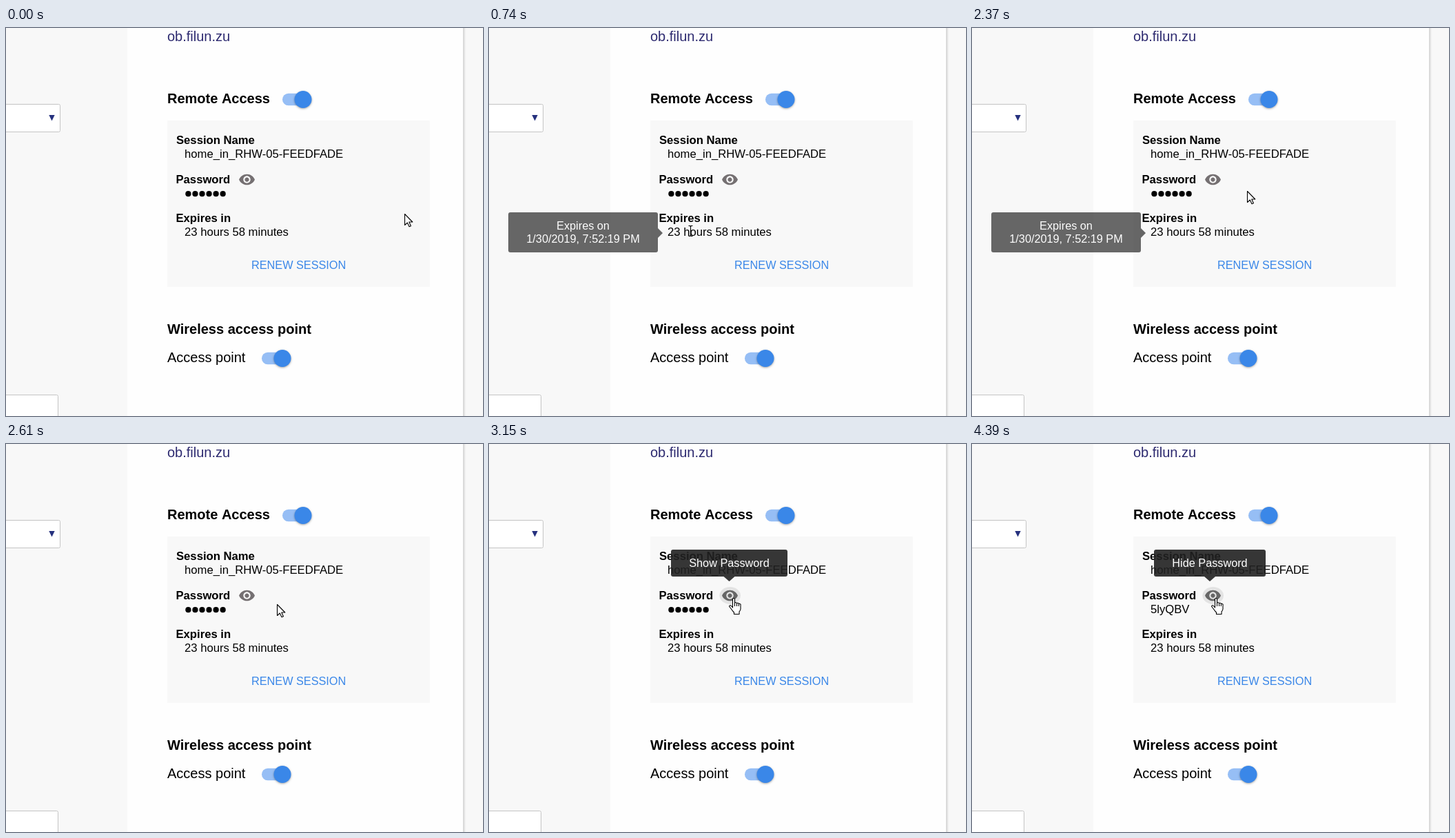
An HTML page with a canvas that plays this animation: 692 by 562 pixels, repeating every 5.33 s.

```html
<!DOCTYPE html>
<html lang="en">
<head>
<meta charset="utf-8">
<title>Remote access settings</title>
<style>
html, body { margin: 0; width: 100%; height: 100%; overflow: hidden; background: #fefefe; }
canvas { display: block; }
</style>
</head>
<body>
<canvas id="stage" width="692" height="562"></canvas>
<script>
const LOOP = 5330, W = 692, H = 562;
const REVEAL = 4040;
const FONT = '"Liberation Sans", Arial, sans-serif';
const BLUE = '#3a87e8';

const stage = document.getElementById('stage').getContext('2d');
const layer = document.createElement('canvas');
layer.width = W;
layer.height = H;
const bubble = layer.getContext('2d');

const EYE = new Path2D('M12 4.5C7 4.5 2.73 7.61 1 12c1.73 4.39 6 7.5 11 7.5s9.27-3.11 11-7.5c-1.73-4.39-6-7.5-11-7.5z' +
  'M12 17c-2.76 0-5-2.24-5-5s2.24-5 5-5 5 2.24 5 5-2.24 5-5 5z' +
  'M12 9c-1.66 0-3 1.34-3 3s1.34 3 3 3 3-1.34 3-3-1.34-3-3-3z');
const ARROW = new Path2D('M.5 .5V16.5L4.3 13L7 18.8L9.4 17.7L6.8 12H11.8Z');
const IBEAM = new Path2D('M-3 -7.5H-1L0 -6.5L1 -7.5H3M0 -6.5V6.5M-3 7.5H-1L0 6.5L1 7.5H3');
const HAND = new Path2D('M5.5 14V2Q5.5 .5 7 .5T8.5 2V8Q8.5 6.5 10 6.5T11.5 8.5Q11.5 7 13 7.2T14.3 9' +
  'Q14.5 8 16 8.5T17 10.5V16Q16.6 18.5 15 20V23.5H7.5V21Q5 18.5 3.5 16L.7 12.5Q.5 10.5 2.3 10.7Q3.8 11.3 5.5 14Z' +
  'M8.5 8V12M11.5 8.5V12M14.3 9V12');

// Progress 0..1 in n equal hard steps, the first at start and the last at end.
function steps(t, start, end, n) {
  if (t < start) return 0;
  const k = Math.floor((t - start + 8) / ((end - start) / (n - 1)));
  return Math.min(n, k + 1) / n;
}

const smooth = u => u * u * (3 - 2 * u);

function curve(u, from, via, to) {
  return from.map((a, i) => (1 - u) ** 2 * a + 2 * u * (1 - u) * via[i] + u * u * to[i]);
}

function pointer(t) {
  if (t < 600) return curve(smooth(steps(t, 80, 420, 6)), [578, 269], [400, 217], [298, 287]);
  if (t < 1830) return [292, 293.5];
  if (t < 2370) {
    const u = 1 - (1 - steps(t, 1830, 2290, 7)) ** 1.2;
    return curve(u, [292, 293], [346, 231], [399, 237]);
  }
  return curve(steps(t, 2370, 2840, 7) ** 1.5, [399, 237], [398, 231], [370, 225]);
}

function text(c, str, x, y, size, color = '#000', weight = 400, align = 'left') {
  c.font = `${weight} ${size}px ${FONT}`;
  c.fillStyle = color;
  c.textAlign = align;
  c.fillText(str, x, y);
}

function rect(x, y, w, h, color) {
  stage.fillStyle = color;
  stage.fillRect(x, y, w, h);
}

function disc(x, y, r, color) {
  stage.fillStyle = color;
  stage.beginPath();
  stage.arc(x, y, r, 0, 2 * Math.PI);
  stage.fill();
}

function field(right, top, height) {
  stage.beginPath();
  stage.roundRect(-9.5, top + .5, right + 9, height, 2);
  stage.fillStyle = '#fff';
  stage.fill();
  stage.strokeStyle = '#c4c4c4';
  stage.lineWidth = 1;
  stage.stroke();
}

function toggle(x, y) {
  stage.fillStyle = '#96bef5';
  stage.beginPath();
  stage.roundRect(x, y - 8.75, 42, 17.5, 8.75);
  stage.fill();
  stage.save();
  stage.shadowColor = 'rgba(0,0,0,.35)';
  stage.shadowBlur = 3;
  stage.shadowOffsetY = 1;
  disc(x + 30, y, 12.5, BLUE);
  stage.restore();
}

function page() {
  rect(0, 0, W, H, '#fefefe');
  rect(0, 0, 176, H, '#f8f8f8');
  rect(663, 0, 29, H, '#f8f8f8');
  const shade = stage.createLinearGradient(662.5, 0, 667, 0);
  shade.addColorStop(0, '#cbcbcb');
  shade.addColorStop(1, '#f8f8f8');
  rect(663, 0, 4, H, shade);
  rect(234, 134, 381, 241, '#f8f8f8');

  field(79, 110, 40);
  field(76, 531, 50);
  stage.fillStyle = '#26317e';
  stage.beginPath();
  stage.moveTo(62.3, 126);
  stage.lineTo(70.7, 126);
  stage.lineTo(66.5, 134.5);
  stage.fill();

  text(stage, 'ob.filun.zu', 234, 19, 20, '#2d2a70');
  text(stage, 'Remote Access', 234, 109, 20, '#000', 700);
  text(stage, 'Wireless access point', 234, 443, 20, '#000', 700);
  text(stage, 'Access point', 234, 484, 20);
  toggle(401, 103.5);
  toggle(371, 478.5);

  text(stage, 'Session Name', 247, 168, 16.67, '#000', 700);
  text(stage, 'home_in_RHW-05-FEEDFADE', 259, 188, 16.67);
  text(stage, 'Password', 246.5, 225, 16.67, '#000', 700);
  text(stage, 'Expires in', 246.5, 281, 16.67, '#000', 700);
  text(stage, '23 hours 58 minutes', 259, 301, 16.67);
  text(stage, 'RENEW SESSION', 424.6, 349, 16.25, BLUE, 400, 'center');
}

function password(t) {
  const hover = t >= 2910;
  if (hover) {
    stage.fillStyle = '#e3e3e3';
    stage.beginPath();
    stage.ellipse(349.7, 219.5, 15.3, 12.5, 0, 0, 2 * Math.PI);
    stage.fill();
  }
  stage.save();
  stage.translate(337, 207);
  stage.scale(25 / 24, 25 / 24);
  stage.fillStyle = hover ? '#666' : '#757072';
  stage.fill(EYE, 'evenodd');
  stage.restore();

  if (t >= REVEAL) text(stage, '5lyQBV', 259, 245, 16.67);
  else for (let i = 0; i < 6; i++) disc(264.4 + i * 10.05, 240.2, 4.1, '#000');
}

function tooltip(alpha, x, y, w, h, lines, tip) {
  if (alpha <= 0) return;
  bubble.clearRect(0, 0, W, H);
  bubble.fillStyle = 'rgba(33,33,33,.9)';
  bubble.beginPath();
  bubble.roundRect(x, y, w, h, 3);
  bubble.fill();
  bubble.beginPath();
  tip.forEach(p => bubble.lineTo(...p));
  bubble.fill();
  lines.forEach((line, i) => text(bubble, line, x + w / 2, y + 25 + i * 19, 16.25, '#fff', 400, 'center'));
  stage.globalAlpha = alpha;
  stage.drawImage(layer, 0, 0);
  stage.globalAlpha = 1;
}

function tooltips(t) {
  const expiry = steps(t, 600, 820, 4) - steps(t, 2370, 2610, 4);
  tooltip(expiry, 28, 267, 217, 58, ['Expires on', '1/30/2019, 7:52:19 PM'],
    [[245, 290], [252, 297], [245, 304]]);

  const shown = t >= REVEAL;
  const width = shown ? 162 : 169, mid = 264 + width / 2;
  tooltip(steps(t, 2910, 3150, 4), 264, 153, width, 39, [shown ? 'Hide Password' : 'Show Password'],
    [[mid - 8, 192], [mid + 8, 192], [mid, 199]]);
}

function drawCursor(path, x, y, filled = true) {
  stage.save();
  stage.translate(x, y);
  stage.lineWidth = 1.1;
  stage.lineJoin = 'round';
  stage.strokeStyle = '#000';
  stage.fillStyle = '#fff';
  if (filled) stage.fill(path);
  stage.stroke(path);
  stage.restore();
}

function cursor(t) {
  if (t >= 3920 && t < 4100) {
    stage.globalCompositeOperation = 'multiply';
    disc(352.5, 224, 17, '#fffa6e');
    stage.globalCompositeOperation = 'source-over';
  }
  if (t >= 2910) return drawCursor(HAND, t < 3920 ? 348 : 347, 223);
  const [x, y] = pointer(t).map(Math.round);
  const overLabel = x < 327 && y > 266 && y <= 286;
  const overValue = x < 410 && y > 286 && y < 304;
  if (overLabel || overValue) drawCursor(IBEAM, x + .5, y, false);
  else drawCursor(ARROW, x, y);
}

function frame() {
  const t = performance.now() % LOOP;
  page();
  password(t);
  tooltips(t);
  cursor(t);
  requestAnimationFrame(frame);
}
frame();
</script>
</body>
</html>
```
